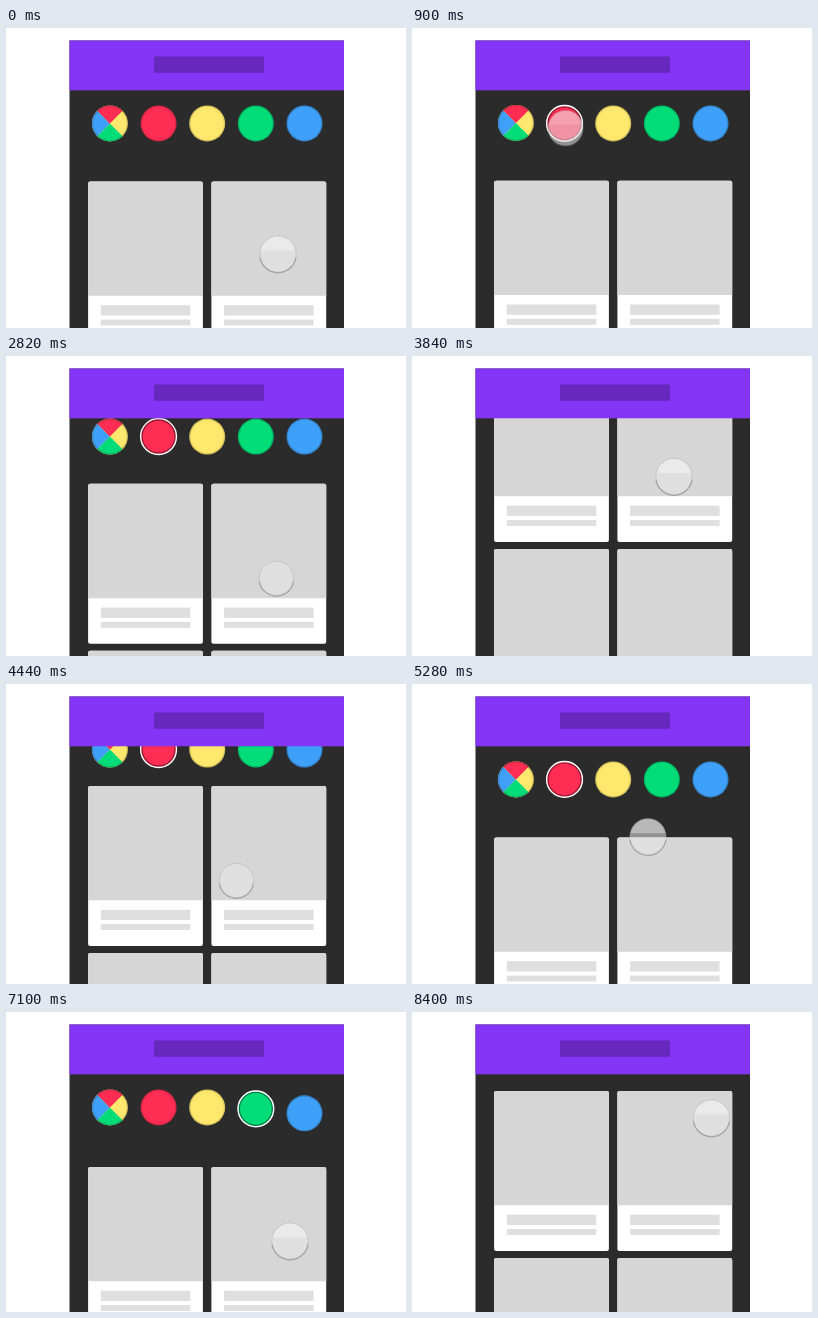
Write an HTML page with a canvas that moves like this. It is 400 px wide and 300 px high and loops after 8.5 s.

```html
<!DOCTYPE html>
<html lang="en">
<head>
<meta charset="utf-8">
<title>Colour filter bar</title>
<style>
html, body { margin: 0; width: 100%; height: 100%; overflow: hidden; background: #fff; }
canvas { display: block; width: 400px; height: 300px; }
</style>
</head>
<body>
<canvas id="stage" width="400" height="300"></canvas>
<script>
const ctx = document.getElementById('stage').getContext('2d');
const LOOP = 8500;
const RED = '#ff2d53', YELLOW = '#ffe86d', GREEN = '#00dd78', BLUE = '#3fa0f9';
const DOTS = [null, RED, YELLOW, GREEN, BLUE];
const REST = 153.5, FOLDED = 79, DOT_Y = 95.4;

const clamp = v => Math.max(0, Math.min(1, v));
const mix = (a, b, p) => a + (b - a) * p;
const ease = p => (1 - Math.cos(Math.PI * p)) / 2;
const backOut = p => 1 + 2.7 * (p - 1) ** 3 + 1.7 * (p - 1) ** 2;
const lastBefore = (events, t) => events.filter(e => e.at <= t).pop();
const dotX = i => 103.9 + i * 48.65;

// The hand's script: every step starts where the one before it ended.
const steps = [], picks = [], folds = [];
let here = { x: 272, y: 226, top: REST };
let clock = 0;

function step(until, change, held = false) {
  const to = { ...here, ...change };
  steps.push({ at: clock, until, from: here, to, held });
  here = to;
  clock = until;
}

const wait = until => step(until, {});
const glide = (until, x, y) => step(until, { x, y });

function drag(until, dx, dy) {
  step(until, { x: here.x + dx, y: here.y + dy, top: here.top + dy }, true);
}

function tap(i, arrive) {
  step(arrive, { x: dotX(i) + 1, y: 100, top: REST });
  step(arrive + 100, {}, true);
  picks.push({ at: arrive + 50, dot: i });
  folds.push({ at: clock, folded: true });
  step(clock + 340, { y: 106, top: FOLDED });
}

function reveal(until) {
  drag(until, 0, 76);
  folds.push({ at: clock, folded: false });
}

tap(1, 780);
glide(1400, 296, 167);
reveal(1748);
step(2480, { x: 272.5, y: 248, top: REST });
drag(3632, -10.5, -127.5);
wait(3960);
drag(4816, -53, 127.5);
tap(3, 5600);
wait(6440);
glide(6530, 284, 153);
reveal(6780);
wait(7200);
tap(4, 7700);

function pose(t) {
  const s = steps.find(s => t < s.until);
  if (!s) return here;
  const p = ease((t - s.at) / (s.until - s.at));
  return {
    x: mix(s.from.x, s.to.x, p),
    y: mix(s.from.y, s.to.y, p),
    top: mix(s.from.top, s.to.top, p)
  };
}

function pressure(t) {
  const amounts = steps.filter(s => s.held)
    .map(s => clamp((t - s.at) / 60) * clamp((s.until + 60 - t) / 60));
  return Math.max(...amounts);
}

function rect(x, y, w, h, color) {
  ctx.fillStyle = color;
  ctx.fillRect(x, y, w, h);
}

function disc(x, y, r, color) {
  ctx.beginPath();
  ctx.arc(x, y, r, 0, Math.PI * 2);
  ctx.fillStyle = color;
  ctx.fill();
}

function ring(x, y, r, width, color) {
  ctx.beginPath();
  ctx.arc(x, y, r, 0, Math.PI * 2);
  ctx.lineWidth = width;
  ctx.strokeStyle = color;
  ctx.stroke();
}

function clipped(x, y, w, h, paint) {
  ctx.save();
  ctx.beginPath();
  ctx.rect(x, y, w, h);
  ctx.clip();
  paint();
  ctx.restore();
}

function card(x, y) {
  ctx.beginPath();
  ctx.roundRect(x, y, 114.8, 160, 2);
  ctx.fillStyle = '#fff';
  ctx.fill();
  ctx.beginPath();
  ctx.roundRect(x, y, 114.8, 114.3, [2, 2, 0, 0]);
  ctx.fillStyle = '#d6d6d6';
  ctx.fill();
  rect(x + 12.7, y + 123.7, 89.5, 10.3, '#dfdfdf');
  rect(x + 12.7, y + 138, 89.5, 6, '#dfdfdf');
}

function dot(i, x, y, picked) {
  disc(x, y, 18, DOTS[i] || YELLOW);
  if (i === 0) {
    [GREEN, BLUE, RED].forEach((color, q) => {
      const from = (q + 0.5) * Math.PI / 2;
      ctx.beginPath();
      ctx.moveTo(x, y);
      ctx.arc(x, y, 18, from, from + Math.PI / 2);
      ctx.fillStyle = color;
      ctx.fill();
    });
  }
  ring(x, y, 17.4, 1.5, 'rgba(0,0,0,.16)');
  if (picked) {
    ring(x, y, 16.5, 1.4, 'rgba(0,0,0,.4)');
    ring(x, y, 17.9, 1.4, '#fff');
  }
}

// Vertical shift of a dot while the bar folds away or drops in.
function dotShift(i, fold, t) {
  if (!fold) return 0;
  const age = t - fold.at;
  if (fold.folded) return -60 * clamp((age - i * 25) / 230) ** 2;
  return -60 * (1 - backOut(clamp((age - i * 55) / 180)));
}

function pointer(x, y, press) {
  const r = 18.2 - press;
  disc(x, y, r, 'rgba(232,232,232,.55)');
  clipped(x - 20, y - 20, 40, 16.5, () => {
    disc(x, y, r - 0.5, `rgba(255,255,255,${0.35 * (1 - press)})`);
  });
  ring(x, y, r, 0.8, 'rgba(150,150,150,.4)');
  ctx.beginPath();
  ctx.arc(x, y + 0.6, r, 0.15, Math.PI - 0.15);
  ctx.lineWidth = 1.2;
  ctx.strokeStyle = 'rgba(100,100,100,.4)';
  ctx.stroke();
}

function draw(t) {
  const { x, y, top } = pose(t);
  const pick = lastBefore(picks, t);
  const fold = lastBefore(folds, t);
  const open = !fold || !fold.folded;
  const scroll = open ? Math.min(0, top - REST) * 0.58 : 0;

  rect(0, 0, 400, 300, '#fff');
  rect(63.5, 12.5, 274.5, 287.5, '#2b2b2b');

  clipped(63.5, 62, 274.5, 238, () => {
    DOTS.forEach((_, i) => {
      dot(i, dotX(i), DOT_Y + dotShift(i, fold, t) + scroll, pick && pick.dot === i);
    });
    for (let row = 0; row < 3; row++) {
      card(82.1, top + row * 167);
      card(205.4, top + row * 167);
    }
  });

  rect(63.5, 12.5, 274.5, 49.8, '#8435f6');
  rect(148, 28.4, 110, 16.4, '#6728bd');
  pointer(x, y, pressure(t));
}

const start = performance.now();
function tick() {
  draw((performance.now() - start) % LOOP);
  requestAnimationFrame(tick);
}
tick();
</script>
</body>
</html>
```
